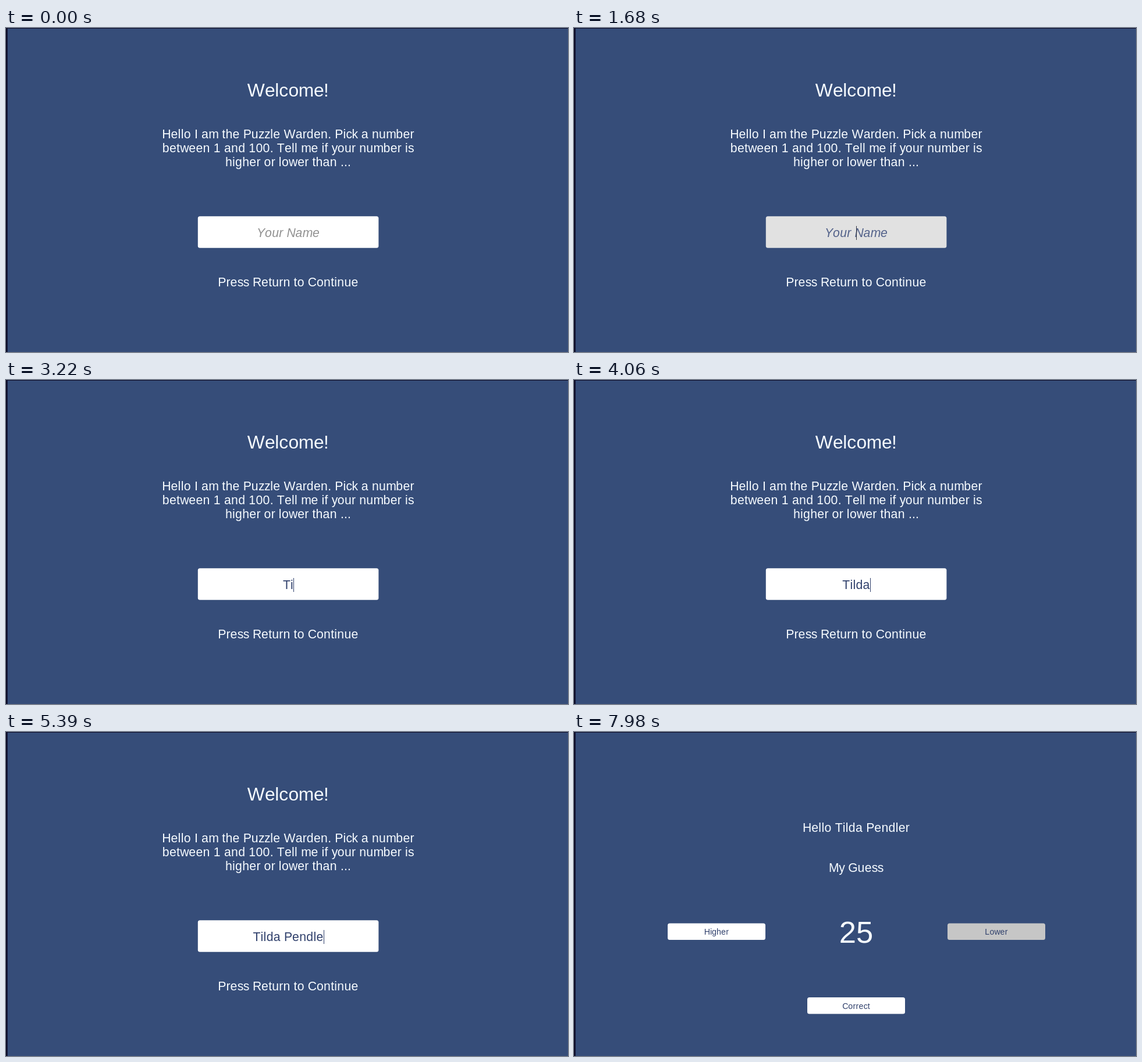
An HTML page for the animation above (8 s loop, 966x558 px).

```html
<!DOCTYPE html>
<html lang="en">
<head>
<meta charset="utf-8">
<title>Guessing game</title>
<style>
html, body { margin: 0; width: 100%; height: 100%; overflow: hidden; background: #364d79; }
svg { display: block; width: 966px; height: 558px; fill: #f6fbff; }
text { font-family: "Liberation Sans", Arial, sans-serif; white-space: pre; }
</style>
</head>
<body>
<svg id="stage" viewBox="0 0 966 558">
  <rect width="966" height="558" fill="#364d79"/>
  <rect width="966" height="1" fill="#0b0a26"/>
  <rect width="2.6" height="558" fill="#0b0a26"/>
</svg>
<script>
const LOOP = 8000, STEP = 70, MID = 485;
const SCALE = 1.01; // the interface is laid out on whole pixels, then enlarged a little
const INK = "#30406c";
const NAME = "Tilda Pendler";
const KEY_TIMES = [2940, 3150, 3360, 3570, 3780, 4130, 4340, 4550, 4760, 4970, 5110, 5320, 5460];
const FOCUS = 1610, BLINK = 590, START = 6090;

const stage = document.getElementById("stage");
const pen = document.createElement("canvas").getContext("2d");
pen.font = '1000px "Liberation Sans", Arial, sans-serif';

function add(parent, tag, attrs) {
  const el = document.createElementNS("http://www.w3.org/2000/svg", tag);
  for (const key in attrs) el.setAttribute(key, attrs[key]);
  return parent.appendChild(el);
}

// Whole-pixel advance of one glyph, with halves rounded down.
function advance(c, size) {
  return Math.ceil(Math.round(pen.measureText(c).width) * size / 1000 - 0.52) * SCALE;
}

// Centres a string on cx; returns its width.
function setText(el, str, cx, size) {
  const steps = [...str].map(c => advance(c, size));
  const width = steps.reduce((a, b) => a + b, 0);
  let x = cx - width / 2;
  el.setAttribute("x", steps.map(s => { const at = x; x += s; return at.toFixed(2); }).join(" "));
  el.textContent = str;
  return width;
}

function label(parent, str, cx, y, size, attrs) {
  const el = add(parent, "text", { y, "font-size": size * SCALE, ...attrs });
  setText(el, str, cx, size);
  return el;
}

function panel(parent, x, y, width, height) {
  return add(parent, "rect", { x, y, width, height, rx: 3.5, fill: "#fff" });
}

function button(parent, str, x, y) {
  const box = panel(parent, x, y, 168, 28.5);
  label(parent, str, x + 84, y + 19.5, 14, { fill: INK });
  return box;
}

// Linear interpolation through [time, value] pairs.
function ramp(t, points) {
  if (t <= points[0][0]) return points[0][1];
  for (let i = 1; i < points.length; i++) {
    const [t0, v0] = points[i - 1], [t1, v1] = points[i];
    if (t <= t1) return v0 + (v1 - v0) * (t - t0) / (t1 - t0);
  }
  return points[points.length - 1][1];
}

function shade(el, level) {
  const v = Math.round(level);
  el.setAttribute("fill", `rgb(${v},${v},${v})`);
}

function show(el, on) {
  el.style.display = on ? "" : "none";
}

const intro = add(stage, "g", {});
label(intro, "Welcome!", MID, 118, 31.5);
["Hello I am the Puzzle Warden. Pick a number",
 "between 1 and 100. Tell me if your number is",
 "higher or lower than ..."].forEach((line, i) => label(intro, line, MID, 190 + 24 * i, 21));
const field = panel(intro, 329.8, 324.3, 310.6, 54.5);
const hint = label(intro, "Your Name", MID, 360, 21, { "font-style": "italic" });
const entry = label(intro, "", MID, 360, 21, { fill: INK });
const caret = add(intro, "rect", { y: 341, width: 1, height: 24 });
label(intro, "Press Return to Continue", MID, 445, 21);

const game = add(stage, "g", {});
label(game, "Hello " + NAME, MID, 172, 21);
label(game, "My Guess", MID, 241, 21);
label(game, "25", MID, 363, 52);
button(game, "Higher", 161, 329.5);
const lower = button(game, "Lower", 642, 329.5);
const correct = button(game, "Correct", 401, 457);

function drawIntro(t) {
  const level = ramp(t, [[1610, 255], [1680, 225], [1750, 200], [1820, 200], [1920, 255]]);
  shade(field, level);

  const typed = KEY_TIMES.filter(k => k <= t).length;
  show(hint, !typed);
  hint.setAttribute("fill", level < 240 ? "#53628a" : "#919191");
  const width = setText(entry, NAME.slice(0, typed), MID, 21);

  const since = t - (typed ? KEY_TIMES[typed - 1] : FOCUS);
  show(caret, since >= 0 && Math.floor(since / BLINK) % 2 === 0);
  caret.setAttribute("x", Math.round(MID + width / 2));
  caret.setAttribute("fill", typed ? INK : "#30343f");
}

function drawGame(t) {
  shade(correct, ramp(t, [[6790, 255], [6930, 245], [7140, 245], [7280, 255]]));
  shade(lower, ramp(t, [[7560, 255], [7630, 245], [7770, 245], [7910, 198]]));
}

function draw(now) {
  const t = Math.floor((now % LOOP) / STEP) * STEP;
  const playing = t >= START;
  show(intro, !playing);
  show(game, playing);
  if (playing) drawGame(t); else drawIntro(t);
}

const begin = performance.now();
function tick() {
  draw(performance.now() - begin);
  requestAnimationFrame(tick);
}
tick();
</script>
</body>
</html>
```
